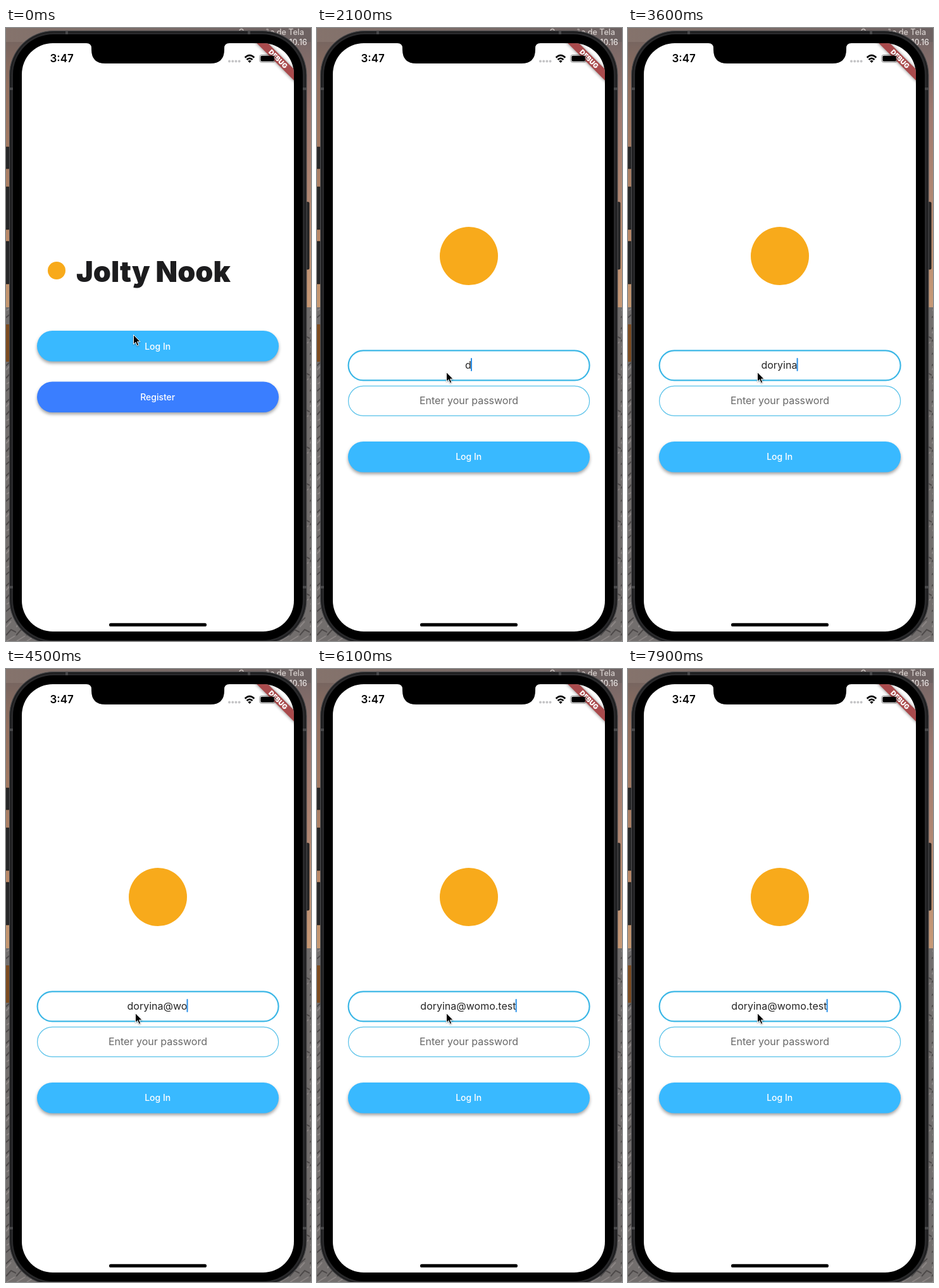
These frames come from a looping animation (482x968 px, 8 s). An HTML page:

```html
<!DOCTYPE html>
<html lang="en">
<head>
<meta charset="utf-8">
<title>Chat login</title>
<style>
  html, body { margin: 0; width: 100%; height: 100%; overflow: hidden; background: #6d6968; }
  svg { display: block; width: 482px; height: 968px; }
  text { font-family: Inter, "Liberation Sans", sans-serif; font-size: 16px; white-space: pre; }
  .mid { text-anchor: middle; }
  .end { text-anchor: end; }
  .btn { filter: drop-shadow(0 3px 2.5px rgba(0, 0, 0, .36)); }
  .label { font-size: 14px; font-weight: 500; fill: #fff; }
  .field { fill: #fff; stroke: #57c1e9; stroke-width: 1.2; }
  .field.focus { stroke: #3cb7e6; stroke-width: 2.2; }
  .hint { fill: #686868; }
  .desk { font-size: 12.5px; font-weight: 500; fill: #d6cfcc; }
</style>
</head>
<body>
<svg viewBox="0 0 482 968">
  <defs>
    <linearGradient id="skyL" x2="0" y2="1">
      <stop offset="0" stop-color="#6f6260"/>
      <stop offset=".2" stop-color="#93705f"/>
      <stop offset=".75" stop-color="#bb8a69"/>
      <stop offset="1" stop-color="#c79a72"/>
    </linearGradient>
    <linearGradient id="skyR" x2="0" y2="1">
      <stop offset="0" stop-color="#706465"/>
      <stop offset=".3" stop-color="#a07a70"/>
      <stop offset="1" stop-color="#c99a76"/>
    </linearGradient>
    <linearGradient id="top">
      <stop offset="0" stop-color="#85736c"/>
      <stop offset="1" stop-color="#6c6161"/>
    </linearGradient>
    <pattern id="rock" width="16" height="58" patternUnits="userSpaceOnUse">
      <rect width="16" height="58" fill="#726e6d"/>
      <path d="M-1 12L9 3M0 31L8 22L16 26M-1 52L10 43" stroke="#4d4949" stroke-width="2" fill="none"/>
      <path d="M0 18L8 9M1 40L14 32" stroke="#8b8584" stroke-width="2"/>
    </pattern>
    <clipPath id="screen"><rect x="25" y="24" width="430" height="929" rx="49"/></clipPath>
    <filter id="soft" x="-20%" y="-60%" width="140%" height="220%"><feGaussianBlur stdDeviation="2.5"/></filter>
  </defs>

  <!-- desktop -->
  <rect width="241" height="452" fill="url(#skyL)"/>
  <rect x="241" width="241" height="445" fill="url(#skyR)"/>
  <rect width="482" height="22" fill="url(#top)"/>
  <rect y="441" width="482" height="527" fill="url(#rock)"/>
  <rect y="468" width="20" height="59" fill="#7c4b20"/>
  <text class="desk end" x="471" y="11">Gravação de Tela</text>
  <text class="desk end" x="476" y="27" style="fill:#e6e1df">10.16</text>

  <!-- phone -->
  <g fill="#272728" stroke="#111" stroke-width=".8">
    <rect x="-2" y="188" width="8" height="34" rx="1.5"/>
    <rect x="-2" y="251" width="8" height="67" rx="1.5"/>
    <rect x="-2" y="337" width="8" height="67" rx="1.5"/>
    <rect x="473" y="275" width="6" height="106" rx="1.5"/>
  </g>
  <rect x="5.5" y="4.5" width="469.500" height="968" rx="70" fill="#29292b" stroke="#4a4a4c"/>
  <rect x="7.500" y="6.500" width="465.500" height="964" rx="68" fill="none" stroke="#151516"/>
  <path d="M6 96h5M6 883h5M469 96h6M469 883h6M96 5v5M384 5v5" stroke="#48484a" stroke-width="4"/>
  <rect x="11" y="10" width="458" height="957" rx="64"/>
  <rect x="25" y="24" width="430" height="929" rx="49" fill="#fff"/>

  <g id="welcome">
    <circle cx="80" cy="383" r="14" fill="#f8aa1b"/>
    <text x="111" y="400.500" style="font-size:45px;font-weight:900" fill="#1c1c1e">Jolty Nook</text>
    <rect class="btn" x="49" y="478" width="382" height="48.500" rx="24.200" fill="#39b9ff"/>
    <text class="label mid" x="239.700" y="507.500">Log In</text>
    <rect class="btn" x="49" y="558.500" width="382" height="48.500" rx="24.200" fill="#3a7eff"/>
    <text class="label mid" x="239.700" y="588">Register</text>
  </g>

  <g id="login">
    <circle cx="240" cy="360" r="46" fill="#f8aa1b"/>
    <rect id="email" class="field" x="49.600" y="509.300" width="381" height="47" rx="23.500"/>
    <text id="hint" class="hint mid" x="240" y="537.500">Enter your email</text>
    <text id="typed" class="mid" x="238.900" y="537.500" fill="#252525"></text>
    <rect id="caret" y="521" width="2" height="21" rx="1" fill="#2a8fe8"/>
    <rect class="field" x="49.600" y="565.400" width="381" height="47" rx="23.500"/>
    <text class="hint mid" x="240" y="593.500">Enter your password</text>
    <rect class="btn" x="49" y="653" width="382" height="48.500" rx="24.200" fill="#39b9ff"/>
    <text class="label mid" x="239.700" y="682.300">Log In</text>
  </g>

  <!-- debug ribbon -->
  <g clip-path="url(#screen)">
    <g transform="translate(455 24) rotate(45)">
      <rect x="-50" y="29" width="100" height="13" fill="#000" opacity=".45" filter="url(#soft)"/>
      <rect x="-60" y="29" width="120" height="12.500" fill="#a94a4c"/>
      <text class="mid" x="0" y="39.100" style="font-size:10.600px;font-weight:900" fill="#fff">DEBUG</text>
    </g>
  </g>

  <!-- status bar -->
  <path d="M127 22V24Q135 24 135 32V34Q135 56 157 56H323Q345 56 345 34V32Q345 24 353 24V22Z"/>
  <text x="69.500" y="54" style="font-size:17px;font-weight:600">3:47</text>
  <path d="M353 52.500h.01M358.200 52.500h.01M363.400 52.500h.01M368.600 52.500h.01" stroke="#c4c4c6" stroke-width="4" stroke-linecap="round"/>
  <g fill="none" stroke="#000" stroke-width="2.600">
    <path d="M377.700 46.700Q385 39.700 392.300 46.700"/>
    <path d="M380.500 50Q385 45.700 389.500 50"/>
  </g>
  <path d="M385 55L382.300 52.200Q385 50 387.700 52.200Z"/>
  <rect x="400.800" y="42.300" width="24.500" height="12" rx="3.500" fill="none" stroke="#000" stroke-opacity=".45"/>
  <rect x="402.300" y="43.800" width="21.500" height="9" rx="2"/>
  <path d="M426.500 46.500Q429 48.300 426.500 50.200Z" opacity=".5"/>
  <rect x="163" y="939.800" width="154" height="5.200" rx="2.600"/>

  <path id="mouse" d="M0 0V14.800L3.400 11.700L5.800 17.200L8.300 16.100L6 10.800H10.600Z" stroke="#fff" style="filter:drop-shadow(0 1px 1px rgba(0,0,0,.35))"/>
</svg>
<script>
  const LOOP = 8000, OPEN = 1200, FOCUS = 1600, ERASE = 7500, MID = 238.9;
  const ADDRESS = "doryina@womo.test";
  // one time per key; the last key is a stray space
  const KEYS = [2000, 2200, 2400, 2550, 2700, 3200, 3500, 4000, 4250, 4400,
                4650, 4850, 5050, 5400, 5700, 5900, 6100, 6300];
  const $ = id => document.getElementById(id);
  const show = (id, on) => $(id).setAttribute("visibility", on ? "inherit" : "hidden");

  function draw(t) {
    const open = t >= OPEN, focus = t >= FOCUS, erased = t >= ERASE;
    const keys = KEYS.filter(k => k <= t);
    const last = erased ? ERASE : keys.at(-1) ?? FOCUS;
    const text = (ADDRESS + "\u00a0").slice(0, erased ? ADDRESS.length : keys.length);

    show("welcome", !open);
    show("login", open);
    show("hint", !text);
    $("email").classList.toggle("focus", focus);
    $("typed").textContent = text;
    const width = text ? $("typed").getComputedTextLength() : 0;
    $("caret").setAttribute("x", MID + width / 2 - 0.8);
    show("caret", focus && (t - last) % 1000 < 500);
    $("mouse").setAttribute("transform", open ? "translate(204.500 543.500)" : "translate(201.500 484.500)");
  }

  const start = performance.now();
  function tick() {
    draw((performance.now() - start) % LOOP);
    requestAnimationFrame(tick);
  }
  tick();
</script>
</body>
</html>
```
